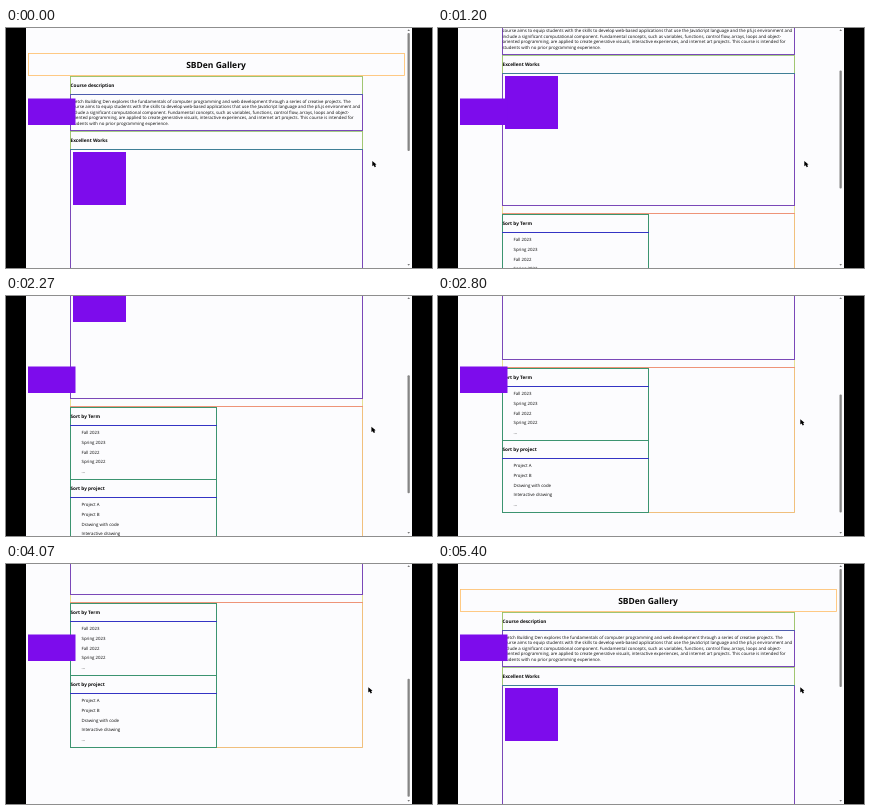
An HTML page that plays this animation: 426 px wide and 240 px high, repeating every 5470 ms.

```html
<!DOCTYPE html>
<html lang="en">
<head>
<meta charset="utf-8">
<title>Gallery page scroll</title>
<style>
html, body { margin: 0; width: 100%; height: 100%; overflow: hidden; background: #000; }
svg { display: block; width: 100vw; height: 100vh; }
text { font-family: "Open Sans", "Noto Sans", sans-serif; font-size: 4.35px; fill: #080808; text-rendering: geometricPrecision; }
.title { font-size: 8.5px; font-weight: 700; text-anchor: middle; }
.head { font-size: 4.7px; font-weight: 700; }
</style>
</head>
<body>
<svg viewBox="0 0 426 240">
  <defs><clipPath id="view"><rect x="20" width="386" height="240"/></clipPath></defs>
  <rect width="426" height="240" fill="#000"/>
  <rect x="20" width="386" height="240" fill="#fcfcfe"/>
  <g clip-path="url(#view)">
    <g id="page"></g>
    <rect x="22" y="70.5" width="47.5" height="26.5" fill="#7d0cec"/>
    <rect id="thumb" x="401.5" y="5" width="2.3" height="118" rx="1" fill="#858585"/>
    <path d="M401.4 3L402.7 1.2L404 3ZM401.4 236L402.7 237.8L404 236Z" fill="#777"/>
    <path id="mouse" d="M0 0V5.2L1.3 4.3L2.4 6.2L3.7 5.5L2.8 3.8L4.2 3.4Z" fill="#000"/>
  </g>
</svg>
<script>
const NS = "http://www.w3.org/2000/svg";
const byId = id => document.getElementById(id);
const page = byId("page"), thumb = byId("thumb"), mouse = byId("mouse");

function add(tag, attrs, content = "") {
  const el = document.createElementNS(NS, tag);
  for (const key in attrs) el.setAttribute(key, attrs[key]);
  el.textContent = content;
  page.append(el);
}
const box = (x1, y1, x2, y2, stroke, weight = 1) =>
  add("rect", { x: x1 + .5, y: y1 + .5, width: x2 - x1, height: y2 - y1, fill: "none", stroke, "stroke-width": weight });
const rule = (x1, x2, y, stroke) =>
  add("rect", { x: x1, y, width: x2 - x1, height: 1, fill: stroke });
const label = (x, y, str, cls = "") => add("text", { x, y, class: cls }, str);

const GREEN = "#3c9470", LIME = "#8fc06a", BLUE = "#3434c4", PURPLE = "#7a48b8";

function buildPage() {
  box(22, 25, 398, 47, "#ffbd66", .8);
  label(210, 39.8, "SBDen Gallery", "title");

  box(64, 48, 356, 406, "#e2d879", .8);
  box(64, 48, 356, 102, LIME, .8);
  label(64.5, 58.8, "Course description", "head");
  box(64, 66, 356, 102, PURPLE);
  rule(64, 357, 66, "#4d5cae");
  [
    "Sketch Building Den explores the fundamentals of computer programming and web development through a series of creative projects. The",
    "course aims to equip students with the skills to develop web-based applications that use the JavaScript language and the p5.js environment and",
    "include a significant computational component. Fundamental concepts, such as variables, functions, control flow, arrays, loops and object-",
    "oriented programming, are applied to create generative visuals, interactive experiences, and internet art projects. This course is intended for",
    "students with no prior programming experience."
  ].forEach((line, i) => label(64.5, 74.5 + i * 5.55, line));

  box(64, 103, 356, 121, LIME, .8);
  label(64.5, 113.9, "Excellent Works", "head");
  box(64, 121, 356, 253, PURPLE);
  rule(64, 357, 121, "#3f7f96");
  add("rect", { x: 67, y: 124, width: 53, height: 53, fill: "#7d0cec" });

  box(64, 261, 356, 406, "#f3b878", .8);
  rule(64, 357, 261, "#ee9478");
  sortBox(262, "Sort by Term", ["Fall 2023", "Spring 2023", "Fall 2022", "Spring 2022", "..."]);
  sortBox(334, "Sort by project", ["Project A", "Project B", "Drawing with code", "Interactive drawing", "..."]);
}

function sortBox(y, title, items) {
  box(64, y, 210, y + 72, GREEN);
  rule(64, 211, y + 18, BLUE);
  label(64.5, y + 10.9, title, "head");
  items.forEach((item, i) => label(75.5, y + 26.9 + i * 9.8, item));
}

// Linear interpolation through [time, value] points
function track(points, t) {
  let i = 1;
  while (i < points.length - 1 && t > points[i][0]) i++;
  const [t0, a] = points[i - 1], [t1, b] = points[i];
  const u = Math.min(1, Math.max(0, (t - t0) / (t1 - t0)));
  return a + (b - a) * u;
}

const LOOP = 5470, STEP = 200 / 3;
const SCROLL = [[70, 0], [1200, 76], [1800, 117], [2800, 190], [3280, 223], [4130, 223], [4733, 121], [5360, 0]];
const MOVE = [[2200, 0], [2500, 1]];

function draw(now) {
  const t = Math.floor((now % LOOP + 4) / STEP) * STEP;
  const y = Math.round(track(SCROLL, t));
  const m = track(MOVE, t);
  page.setAttribute("transform", `translate(0 ${-y})`);
  thumb.setAttribute("y", 5 + y * .492);
  mouse.setAttribute("transform", `translate(${366.3 - 4 * m} ${133 - 9.7 * m})`);
}

buildPage();
const start = performance.now();
function tick() {
  draw(performance.now() - start);
  requestAnimationFrame(tick);
}
tick();
</script>
</body>
</html>
```
